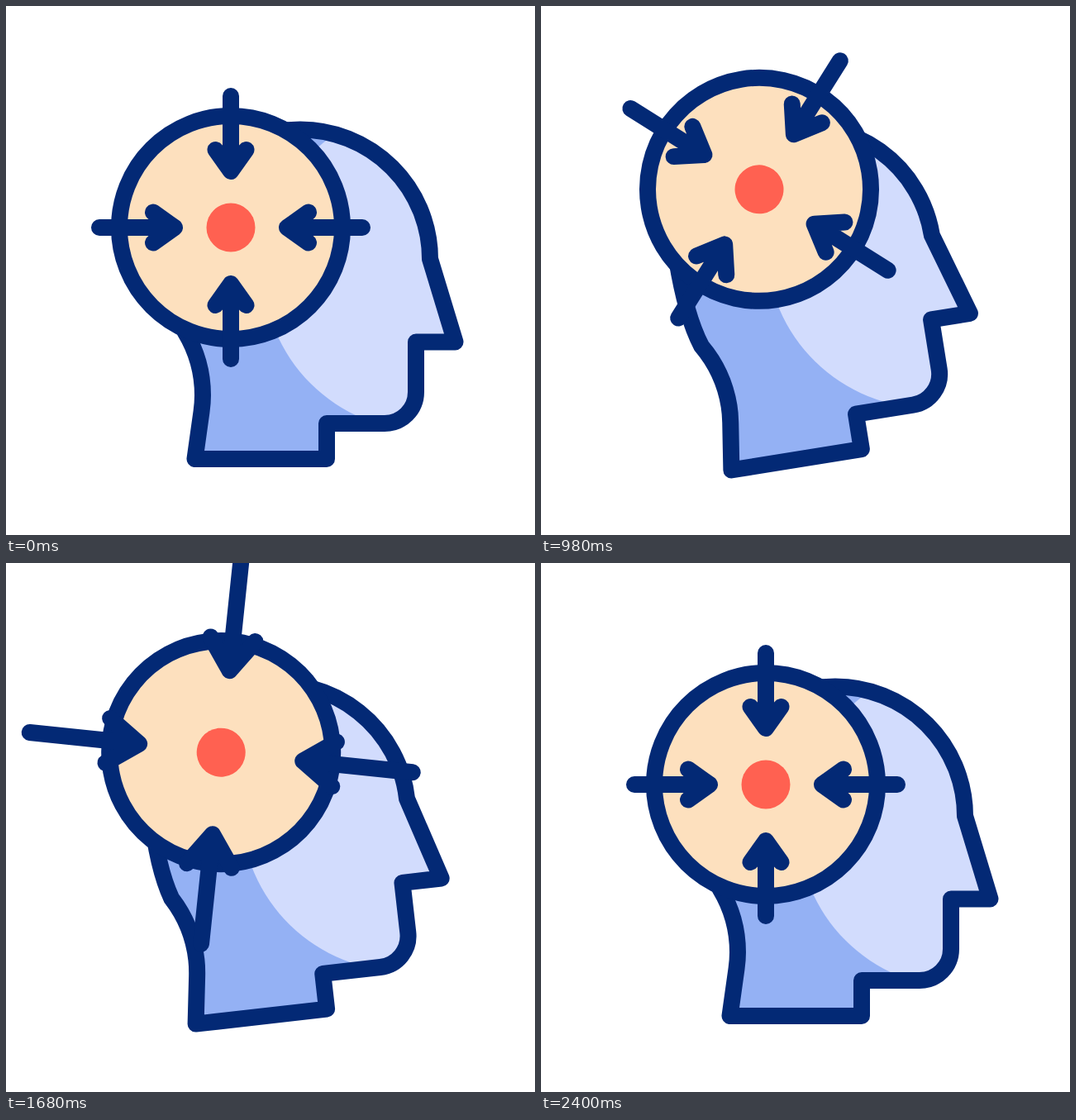
Write an HTML page that moves like this. It is 640x640 px and loops after 2420 ms.

```html
<!DOCTYPE html>
<html lang="en">
<head>
<meta charset="utf-8">
<title>Focused mind</title>
<style>
  html, body { margin: 0; width: 100%; height: 100%; overflow: hidden; background: #fff; }
  svg { display: block; width: 100vw; height: 100vh; }
  .line { stroke: #032975; stroke-width: 20; stroke-linecap: round; stroke-linejoin: round; }
</style>
</head>
<body>
<svg viewBox="0 0 640 640">
  <defs>
    <path id="outline" d="M228.5 548H388V505H458A38 38 0 0 0 496 467V406.5H543.5L513 306
      A157 156.5 0 0 0 356 149.5C270 149.5 203.5 215 203.5 285
      C203.5 325 207 366 216.5 394C231 418 238 446 238 471Q238 480 236.5 491Z"/>
    <clipPath id="inside"><use href="#outline"/></clipPath>
    <path id="arrow" class="line" fill="none"/>
  </defs>
  <g id="head">
    <use href="#outline" fill="#94b1f4"/>
    <circle cx="507" cy="318" r="196" fill="#d2dcfd" clip-path="url(#inside)"/>
    <use href="#outline" class="line" fill="none"/>
    <g id="target">
      <circle class="line" r="135" fill="#fde0be"/>
      <circle r="29.5" fill="#ff6151"/>
      <g id="arrows">
        <use href="#arrow"/>
        <use href="#arrow" transform="rotate(90)"/>
        <use href="#arrow" transform="rotate(180)"/>
        <use href="#arrow" transform="rotate(270)"/>
      </g>
    </g>
  </g>
</svg>
<script>
  const LOOP = 2420, MOVE = 2400;
  const [head, target, arrows, arrow] =
    ["head", "target", "arrows", "arrow"].map(id => document.getElementById(id));
  const smooth = u => u * u * (3 - 2 * u);

  // Eased 0 -> 1 -> 0 over one period
  const pulse = (t, period) => smooth(1 - Math.abs(2 * (t % period) / period - 1));

  function draw() {
    const t = Math.min(performance.now() % LOOP, MOVE);
    const tilt = pulse(t, MOVE);
    const swing = tilt * Math.PI / 2;
    const scale = 1 + 0.517 * pulse(t, MOVE / 2);
    const at = (x, y) => `${x * scale} ${y * scale}`;

    head.setAttribute("transform", `rotate(${-10 * tilt} 314 543)`);
    target.setAttribute("transform",
      `translate(${322.5 - 50.5 * Math.cos(swing)} ${268 - 50.5 * Math.sin(swing)})`);
    arrows.setAttribute("transform", `rotate(${360 * smooth(t / MOVE)})`);
    // The arrows grow away from the centre while their line weight stays
    arrow.setAttribute("d",
      `M${at(0, -159)}L${at(0, -68)}M${at(-18.5, -94)}L${at(0, -68)}L${at(18.5, -94)}`);
    requestAnimationFrame(draw);
  }
  draw();
</script>
</body>
</html>
```
